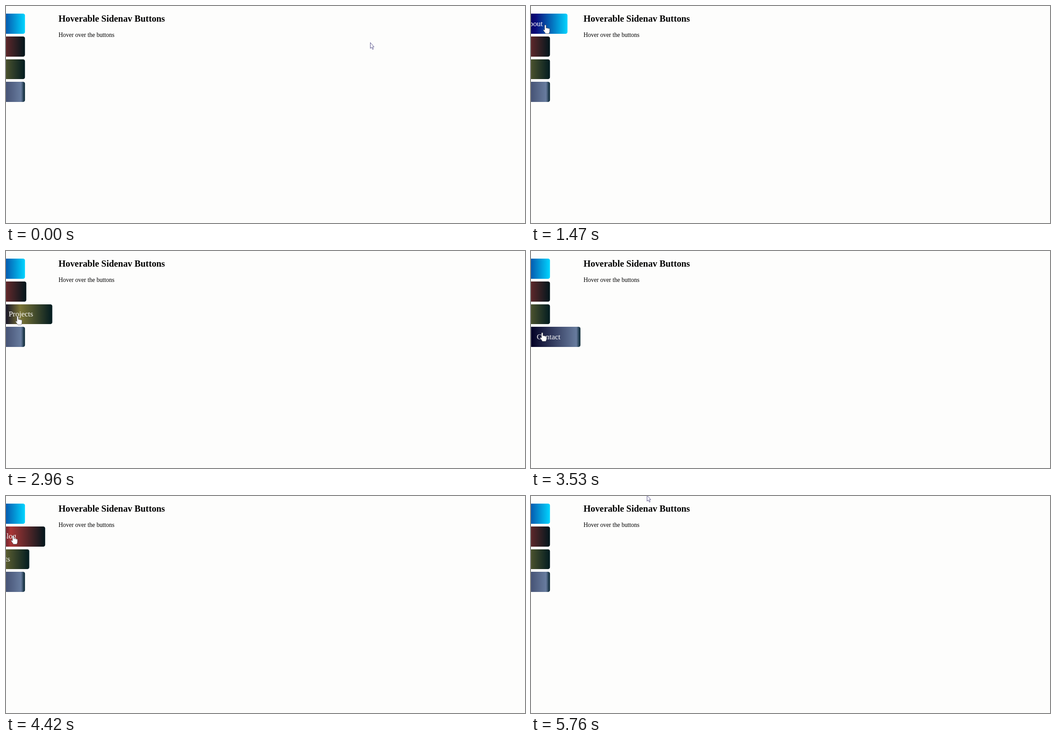
An HTML page that plays this animation: 1156x484 px, repeating every 5790 ms.

```html
<!DOCTYPE html>
<html lang="en">
<head>
<meta charset="utf-8">
<title>Hoverable Sidenav Buttons</title>
<style>
  html { font: 16.94px "Liberation Serif", "Times New Roman", serif; }
  html, body { margin: 0; width: 100%; height: 100%; overflow: hidden; background: #fdfdfc; }

  main { position: absolute; left: 117px; top: 0; color: #000; white-space: nowrap; }
  h2 { margin: 1rem 0; font-size: 1.2rem; line-height: 23px; }
  p { margin: 0; font-size: .8rem; line-height: 16px; }

  nav div {
    position: absolute; left: 0; top: calc(var(--row) * 3rem + 1rem);
    box-sizing: border-box; width: 6.5rem; height: 2.65rem; padding: .75rem;
    border-radius: 0 .25rem .25rem 0;
    color: #fff; line-height: 1.15rem;
    transform: translateX(-4rem);
    animation: 5.79s infinite ease;
  }
  .about    { --row: 0; animation-name: about !important;    background: linear-gradient(90deg, #020024, #090979 35%, #00d4ff); }
  .blog     { --row: 1; animation-name: blog !important;     background: linear-gradient(90deg, #020024, #a83636 30%, #02161c); }
  .projects { --row: 2; animation-name: projects !important; background: linear-gradient(90deg, #020024, #7c7637 35%, #021c20); }
  .contact  { --row: 3; animation-name: contact !important;  background: linear-gradient(90deg, #020024, #687c9e 92%, #02202c); }

  @keyframes about {
    0%, 23.68%, 41.47%, 86.84%, 99.14%, 100% { transform: translateX(-4rem); }
    28.86%, 36.29%, 92.02%, 93.96% { transform: none; }
  }
  @keyframes blog {
    0%, 36.61%, 52.5%, 74.35%, 91.38%, 100% { transform: translateX(-4rem); }
    41.8%, 47.32%, 79.53%, 86.2% { transform: none; }
  }
  @keyframes projects {
    0%, 47.93%, 60.45%, 66.75%, 78.62%, 100% { transform: translateX(-4rem); }
    53.11%, 55.27%, 71.93%, 73.44% { transform: none; }
  }
  @keyframes contact {
    0%, 55.65%, 71.42%, 100% { transform: translateX(-4rem); }
    60.83%, 66.23% { transform: none; }
  }

  .cursor {
    position: absolute; left: 0; top: 0; width: 1px; height: 1px; overflow: visible;
    animation: move 5.79s infinite linear;
  }
  .cursor path { fill: #fff; stroke-linejoin: round; animation: 5.79s infinite step-end; }
  .arrow { stroke: #57528a; animation-name: arrow !important; }
  .hand { stroke: #3c3c44; stroke-width: .7; animation-name: hand !important; }

  @keyframes move {
    0%, 12.44% { transform: translate(811px, 81px); }
    17.3% { transform: translate(430px, 70px); }
    22.1% { transform: translate(95px, 52px); }
    23.68% { transform: translate(42px, 45px); }
    25.39%, 33.16% { transform: translate(32px, 42px); }
    36.29% { transform: translate(30px, 62px); }
    36.61% { transform: translate(30px, 68px); }
    40.07%, 45.08% { transform: translate(30px, 103px); }
    47.32% { transform: translate(29px, 112px); }
    47.93% { transform: translate(29px, 119px); }
    51% { transform: translate(26px, 145px); }
    54.6% { transform: translate(26px, 155px); }
    55.27% { transform: translate(26px, 163px); }
    55.65% { transform: translate(26px, 169px); }
    58.7%, 65.1% { transform: translate(25px, 182px); }
    66.23% { transform: translate(24px, 169px); }
    66.75% { transform: translate(23px, 163px); }
    69.1% { transform: translate(20px, 140px); }
    73.44% { transform: translate(18px, 119px); }
    74.35% { transform: translate(17px, 112px); }
    76.34% { transform: translate(16px, 88px); }
    79.5% { transform: translate(16px, 80px); }
    85.84% { transform: translate(17px, 74px); }
    86.2% { transform: translate(17px, 68px); }
    86.84% { transform: translate(18px, 62px); }
    89.98% { transform: translate(19px, 44px); }
    92.3% { transform: translate(20px, 42px); }
    93.96% { transform: translate(110px, 25px); }
    95.5%, 100% { transform: translate(258px, -2px); }
  }
  /* The hand shows over a button, the arrow everywhere else. */
  @keyframes hand {
    0%, 36.29%, 47.32%, 55.27%, 66.23%, 73.44%, 86.2%, 93.96%, 100% { opacity: 0; }
    23.68%, 36.61%, 47.93%, 55.65%, 66.75%, 74.35%, 86.84% { opacity: 1; }
  }
  @keyframes arrow {
    0%, 36.29%, 47.32%, 55.27%, 66.23%, 73.44%, 86.2%, 93.96%, 100% { opacity: 1; }
    23.68%, 36.61%, 47.93%, 55.65%, 66.75%, 74.35%, 86.84% { opacity: 0; }
  }
</style>
</head>
<body>
  <main>
    <h2>Hoverable Sidenav Buttons</h2>
    <p>Hover over the buttons</p>
  </main>
  <nav>
    <div class="about">About</div>
    <div class="blog">Blog</div>
    <div class="projects">Projects</div>
    <div class="contact">Contact</div>
  </nav>
  <svg class="cursor">
    <path class="arrow" d="M.5 .5V13.5L3.3 11L5.5 15.8L7.4 15L5.3 10.3H8.8Z"/>
    <path class="hand" d="M-1.7 12V1.7a1.7 1.7 0 0 1 3.4 0V7.5a1.5 1.5 0 0 1 2.8 .5a1.5 1.5 0 0 1 2.7 .6a1.4 1.4 0 0 1 2.5 1V14q0 3-2 5.5H.5Q-1.5 16.5-4.6 12.2Q-4.5 9.5-1.7 12Z"/>
  </svg>
</body>
</html>
```
